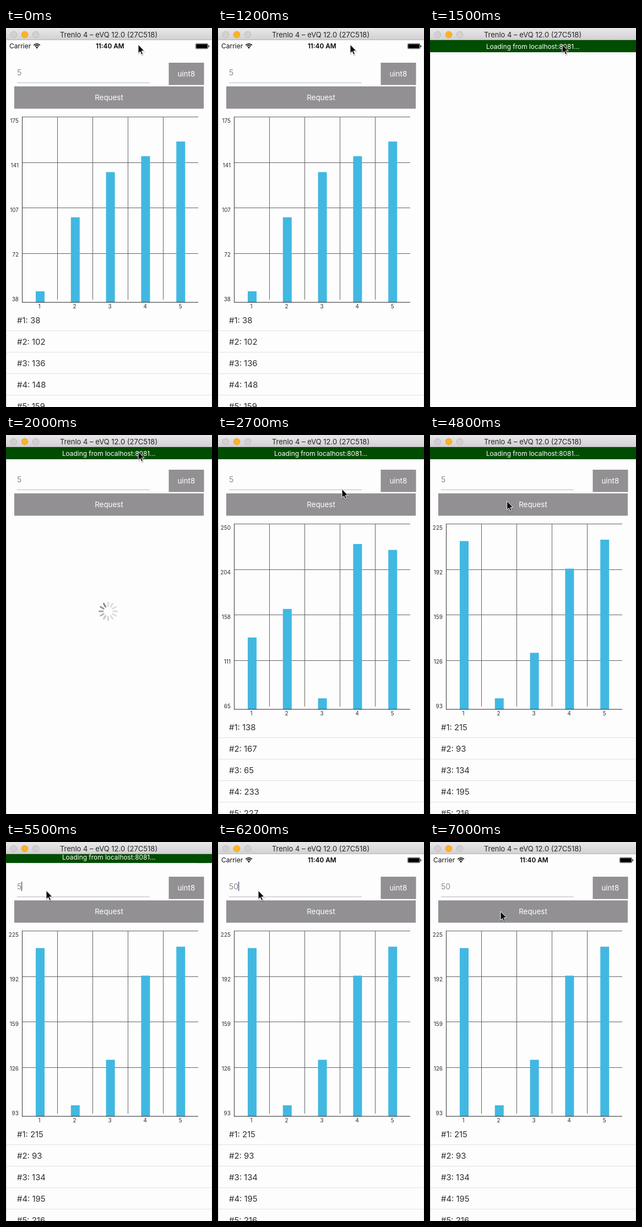
Recreate the animation shown at these times as an HTML page. Size 374 by 688 pixels, loop 8 s.

```html
<!DOCTYPE html>
<html lang="en">
<head>
<meta charset="utf-8">
<title>Request chart</title>
<style>
html, body { margin: 0; width: 100%; height: 100%; overflow: hidden; background: #fdfdfd; }
svg { display: block; width: 374px; height: 688px; font-family: Inter, Roboto, sans-serif; }
</style>
</head>
<body>
<svg id="stage" viewBox="0 0 374 688"></svg>
<script>
const LOOP = 8000, TICK = 100;
const GREY = '#929093', INK = '#2e2e2e', GRID = '#636363';
const stage = document.getElementById('stage');

const SETS = [
  { max: 175, values: [38, 102, 136, 148, 159] },
  { max: 250, values: [138, 167, 65, 233, 227] },
  { max: 225, values: [215, 93, 134, 195, 216] }
];

// Pointer moves: start, end, then the tip at the end.
const START = [240, 30];
const MOVES = [
  [2600, 2700, 225, 98],
  [2700, 2900, 216, 116],
  [3000, 3400, 163, 131],
  [4600, 5200, 73, 88],
  [6200, 7000, 128, 126]
];

const ease = u => { u = Math.min(1, Math.max(0, u)); return u * u * (3 - 2 * u); };
const range = (n, f) => Array.from({ length: n }, (_, i) => f(i)).join('');
const rect = (x, y, w, h, fill, extra = '') =>
  `<rect x="${x}" y="${y}" width="${w}" height="${h}" fill="${fill}" ${extra}/>`;
const line = (x1, y1, x2, y2, stroke, width = 1) =>
  `<path d="M${x1} ${y1}L${x2} ${y2}" stroke="${stroke}" stroke-width="${width}"/>`;
const text = (s, x, y, size, fill, anchor = 'start', weight = 400) =>
  `<text x="${x}" y="${y}" font-size="${size}" fill="${fill}" text-anchor="${anchor}" font-weight="${weight}">${s}</text>`;

function titleBar() {
  const light = (x, fill, stroke) =>
    `<circle cx="${x}" cy="12" r="5.8" fill="${fill}" stroke="${stroke}" stroke-width=".8"/>`;
  return '<linearGradient id="bar" x2="0" y2="1"><stop stop-color="#e9e7e9"/><stop offset="1" stop-color="#d2d0d2"/></linearGradient>'
    + rect(0, 0, 374, 22, 'url(#bar)') + line(0, 21.5, 374, 21.5, '#b5b3b5')
    + light(14, '#d2d0d2', '#b9b7b9') + light(34, '#fdb325', '#dd9c22') + light(54, '#d2d0d2', '#b9b7b9')
    + text('Trenlo 4 – eVQ 12.0 (27C518)', 186.5, 16.7, 13, '#262626', 'middle');
}

function statusBar() {
  const arc = r => `<path d="M${56 - r * .72} ${37 - r * .72}A${r} ${r} 0 0 1 ${56 + r * .72} ${37 - r * .72}" fill="none" stroke="#000" stroke-width="1.7"/>`;
  return text('Carrier', 6, 37.4, 12, '#111') + arc(8) + arc(5)
    + '<path d="M56 37.4L53.9 35.2A3 3 0 0 1 58.1 35.2Z"/>'
    + text('11:40 AM', 188.8, 37.3, 11.8, '#000', 'middle', 600)
    + rect(344.2, 28.3, 22.6, 9.4, 'none', 'rx="2" stroke="#000" stroke-width=".6"')
    + rect(345.2, 29.3, 20.6, 7.4, '#000', 'rx="1"') + rect(367.5, 31.3, 1.4, 3.6, '#000', 'rx=".7"');
}

function banner(t) {
  if (t < 1400) return '';
  const lift = 22 * ease((t - 5415) / 250);
  return `<g transform="translate(0 ${-lift})">` + rect(0, 22, 374, 22, '#004c00')
    + text('Loading from localhost:8081...', 186.7, 38.2, 11.9, '#fff', 'middle') + '</g>';
}

function controls(t) {
  const press = t >= 4100 && t < 4200 ? .86 : 1;
  const caretX = t < 5900 ? 28.5 : 37.5;
  return text(t < 5900 ? '5' : '50', 20, 85.5, 14, '#8b8b8b')
    + (t >= 5400 && t < 6300 ? line(caretX, 72, caretX, 89, '#707690', 1.8) : '')
    + line(20, 99.5, 261, 99.5, '#b3b8c4')
    + rect(295.5, 63, 64, 40.5, GREY) + text('uint8', 327.3, 88, 13.4, '#fff', 'middle')
    + `<g opacity="${press}">` + rect(15, 106, 344, 40.5, GREY)
    + text('Request', 187, 131, 13.4, '#fff', 'middle') + '</g>';
}

function chart({ max, values }) {
  const min = Math.min(...values), span = max - min;
  const bar = (v, i) => {
    const h = Math.max(20, (v - min) / span * 330.5);
    return rect(54 + 63.8 * i, 498 - h, 16, h, '#41b8e1')
      + text(i + 1, 60.6 + 64 * i, 509, 9.8, INK, 'middle');
  };
  const gridY = i => Math.round(161 + 82.6 * i) + .5;
  return range(4, i => line(29, gridY(i), 349, gridY(i), GRID))
    + range(4, i => line(93.5 + 64 * i, 161, 93.5 + 64 * i, 493, GRID))
    + range(5, i => text(Math.round(max - span * i / 4), 23, 171.7 + 81.1 * i, 10, INK, 'end'))
    + values.map(bar).join('')
    + line(29.5, 161, 29.5, 498, '#333') + line(29, 498, 349, 498, '#222', 1.2);
}

const list = ({ values }, top) => values.map((v, i) =>
  text(`#${i + 1}: ${v}`, 20, top + 20.7 + 39 * i, 14.9, INK)
  + line(0, top + 34.5 + 39 * i, 374, top + 34.5 + 39 * i, '#e1e1e3')).join('');

function spinner(head) {
  return range(12, i => {
    const age = (head - i + 120) % 12;
    return `<path d="M0 -9.5V-16" transform="translate(185.5 320) rotate(${30 * i})" stroke="#868686"
      stroke-width="3" stroke-linecap="round" opacity="${Math.max(.27, 1 - age * .13)}"/>`;
  });
}

function content(t) {
  const turn = since => Math.floor((t - since) * .012);
  if (t < 1400) return controls(t) + chart(SETS[0]) + list(SETS[0], 515);
  if (t < 1600) return '';
  if (t < 2100) return controls(t) + spinner(11 + turn(2000));
  if (t < 4100) return controls(t) + chart(SETS[1]) + list(SETS[1], 515);
  if (t < 4300) return controls(t) + spinner(9 + turn(4100)) + list(SETS[1], 500);
  return controls(t) + chart(SETS[2]) + list(SETS[2], 515);
}

function pointer(t) {
  let [x, y] = START;
  for (const [from, to, toX, toY] of MOVES) {
    const u = ease((t - from) / (to - from));
    x += (toX - x) * u;
    y += (toY - y) * u;
  }
  const d = 'M0 0V16L3.6 12.7L6 18.3L8.6 17.2L6.2 11.7H11.2Z';
  return `<g transform="translate(${x} ${y})" stroke-linejoin="round">`
    + `<path d="${d}" transform="translate(.6 1.6)" fill="#000" stroke="#000" stroke-width="2" opacity=".14"/>`
    + `<path d="${d}" fill="#0a0a0a" stroke="#fff" stroke-width="1"/></g>`;
}

const scene = t => rect(0, 0, 374, 688, '#fdfdfd') + statusBar() + content(t)
  + line(.5, 22, .5, 688, '#cfcfcf') + line(373.5, 22, 373.5, 688, '#e2e2e2')
  + banner(t) + titleBar() + pointer(t);

let shown = -1;
function play() {
  const t = Math.floor(performance.now() % LOOP / TICK) * TICK;
  if (t !== shown) stage.innerHTML = scene(shown = t);
  requestAnimationFrame(play);
}
play();
</script>
</body>
</html>
```
